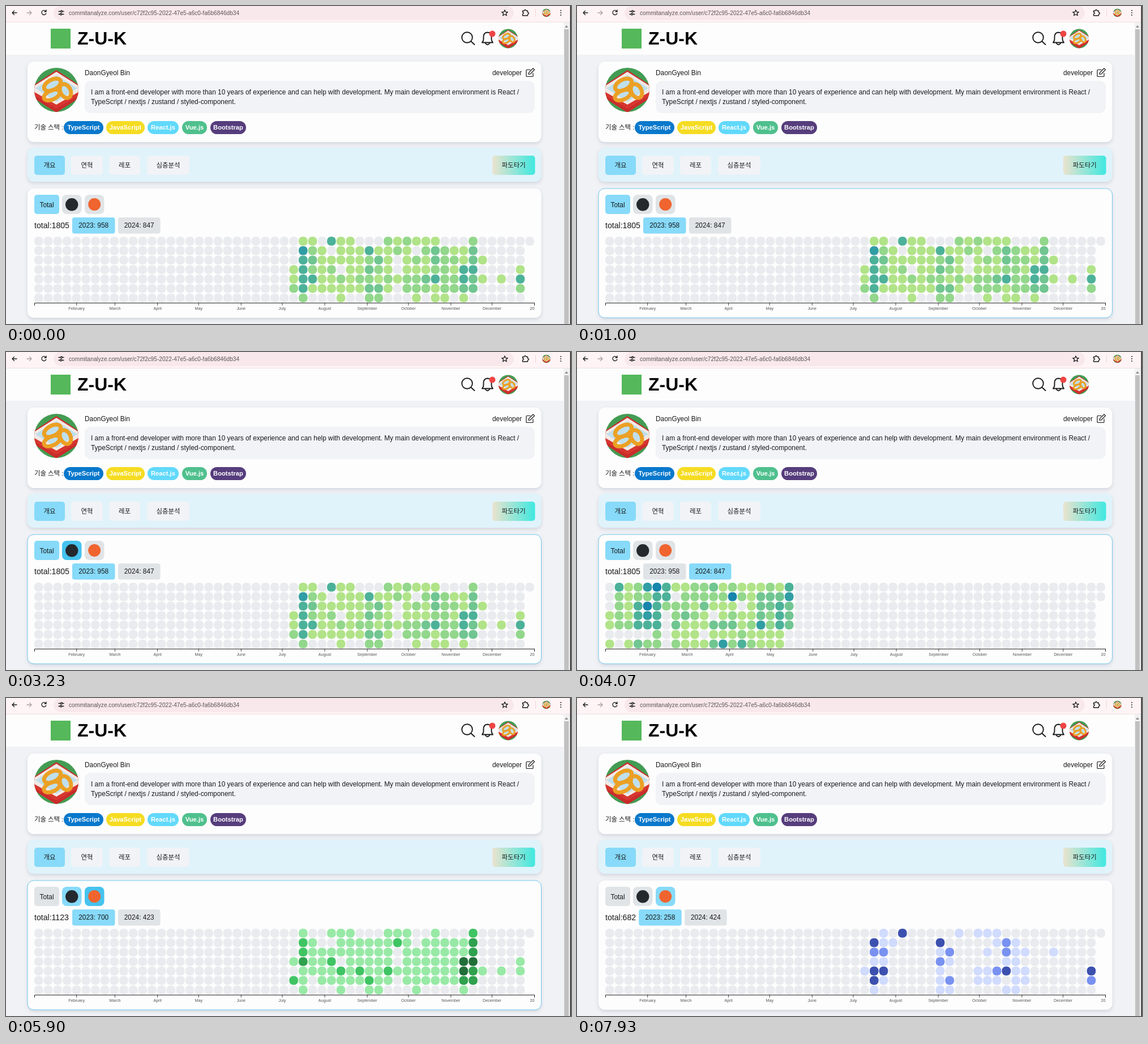
Animation, 998 px wide and 561 px high, one loop 8000 ms. Source, as an HTML page:

```html
<!DOCTYPE html>
<html lang="ko">
<head>
<meta charset="utf-8">
<title>Commit dashboard</title>
<style>
  html, body { margin: 0; width: 100%; height: 100%; overflow: hidden; background: #f0f2f5; }
  svg { display: block; width: 100%; height: 100%; }
  text { font: 11.9px "Liberation Sans", "Noto Sans CJK KR", "Noto Sans CJK", sans-serif; fill: #18191b; }
  .mid { text-anchor: middle; }
  .korean { font-size: 11.4px; }
  .tag { font-size: 11.2px; font-weight: bold; fill: #fff; }
  .axis text { font-size: 7.2px; fill: #555; }
  .card { filter: drop-shadow(0 3px 3px rgba(60, 70, 110, .16)); }
  .line { fill: none; stroke: #18191b; stroke-linecap: round; stroke-linejoin: round; }
</style>
</head>
<body>
<svg viewBox="0 0 998 561">
  <defs>
    <clipPath id="round"><circle cx="40" cy="40" r="39"/></clipPath>
    <clipPath id="plot"><rect x="49" y="520" width="885" height="25"/></clipPath>
    <linearGradient id="wave">
      <stop offset="0" stop-color="#ebe3cd"/>
      <stop offset="1" stop-color="#40e8e0"/>
    </linearGradient>
    <symbol id="avatar" viewBox="0 0 80 80">
      <g clip-path="url(#round)">
        <path fill="#439c53" d="M0 0h80v80H0z"/>
        <path fill="#c92c2b" d="M40 5 84 34v18L40 80-4 52V34z"/>
        <path fill="#f2e9e5" d="M40 8 84 36v8L40 70-4 44v-8z"/>
        <path fill="#d7362f" d="M-4 41 40 66 84 41v7L40 73-4 48z"/>
        <path fill="#bfdfed" d="M40 14 77 37 40 61 3 37z"/>
        <g fill="none" stroke="#eba024" stroke-width="7">
          <ellipse cx="33" cy="31" rx="16" ry="9" transform="rotate(-28 33 31)"/>
          <ellipse cx="56" cy="42" rx="9" ry="13" transform="rotate(-28 56 42)"/>
          <ellipse cx="32" cy="49" rx="15" ry="8" transform="rotate(-24 32 49)"/>
        </g>
      </g>
    </symbol>
  </defs>

  <!-- browser bar -->
  <path fill="#fff4f5" d="M0 0h998v29H0z"/>
  <rect x="84" width="813" height="25" rx="12.5" fill="#f8e8eb"/>
  <path fill="#efdfe2" d="M0 28h998v1H0z"/>
  <g class="line" stroke-width="1.3">
    <path d="M19 12h-8m3.5-3.5L11 12l3.5 3.5"/>
    <path stroke="#aaa0a3" style="stroke:#aaa0a3" d="M37 12h8m-3.5-3.5L45 12l-3.5 3.5"/>
    <path d="M70 9a4 4 0 1 0 .8 4M71 7v3h-3"/>
    <path d="M93 9.5h3m4 0h2m-9 5h2m4 0h3"/>
    <circle cx="98" cy="9.5" r="1.5"/><circle cx="97" cy="14.5" r="1.5"/>
    <path d="m881 7 1.5 3.4 3.7.3-2.8 2.4.9 3.7-3.3-2-3.3 2 .9-3.7-2.8-2.4 3.7-.3z"/>
    <path d="M912.500 8.500h3q0-2 1.500-2t1.500 2h3v3q2 0 2 1.500t-2 1.500v2.500h-9v-3q2 0 2-1.500t-2-1.500z"/>
  </g>
  <path fill="#f0cfd5" d="M935 5h1v14h-1z"/>
  <use href="#avatar" x="947" y="4.500" width="15" height="15"/>
  <g fill="#333"><circle cx="980" cy="8" r="1.100"/><circle cx="980" cy="12" r="1.100"/><circle cx="980" cy="16" r="1.100"/></g>
  <text x="111" y="15.600" style="font-size:10.150px;fill:#5d5457">commitanalyze.com/user/c72f2c95-2022-47e5-a6c0-fa6b6846db34</text>

  <!-- site header -->
  <path fill="#fdfdfd" d="M0 29h985v57H0z"/>
  <rect x="79" y="40" width="35" height="35" fill="#55b85a"/>
  <text x="126" y="67.500" style="font-size:32px;font-weight:bold;fill:#080808">Z-U-K</text>
  <g class="line" stroke-width="1.900">
    <circle cx="814.500" cy="55.500" r="9.300"/>
    <path d="m821.500 62.500 6 5.500"/>
    <path d="M841 64.500q2.500-3 2.500-6v-4q0-7.500 7-8 7 .5 7 8v4q0 3 2.500 6zM847 66q3.500 4.500 7 0"/>
  </g>
  <circle cx="859" cy="49" r="5.500" fill="#ef4444"/>
  <use href="#avatar" x="869.500" y="40" width="35" height="35"/>

  <!-- scrollbar -->
  <path fill="#f2f2f2" d="M985 29h11v532h-11z"/>
  <path fill="#8b8b8b" d="m990 34 3 4h-6z"/>
  <path fill="#c1c1c1" d="M986 41h8v520h-8z"/>
  <path fill="#222" d="M996.500 0h1.500v561h-1.500z"/>

  <!-- profile -->
  <rect class="card" x="38" y="98" width="907.500" height="142" rx="11" fill="#fdfdfd"/>
  <rect id="profileEdge" x="38" y="97.500" width="907.500" height="142.500" rx="11" fill="none" stroke="#74c2ee"/>
  <use href="#avatar" x="49" y="108" width="80" height="80"/>
  <text x="139" y="122">DaonGyeol Bin</text>
  <text x="859" y="122">developer</text>
  <path class="line" stroke-width="1.200" d="M926 112.500h-6q-1 0-1 1v10q0 1 1 1h10q1 0 1-1v-5m-8 2 .5-3 7.500-7.500 2.500 2.500-7.500 7.500z"/>
  <rect x="139" y="132" width="795" height="57" rx="11" fill="#f1f3f6"/>
  <text x="150" y="156">I am a front-end developer with more than 10 years of experience and can help with development. My main development environment is React /</text>
  <text x="150" y="173">TypeScript / nextjs / zustand / styled-component.</text>
  <text class="korean" x="50" y="218">기술 스택 :</text>
  <g id="tags"></g>

  <!-- tabs -->
  <rect class="card" x="38" y="250" width="907.500" height="60" rx="11" fill="#e0f3fb"/>
  <g id="tabs"></g>

  <!-- activity chart -->
  <rect class="card" x="38" y="322" width="907.500" height="228" rx="11" fill="#fdfdfd"/>
  <rect id="chartEdge" x="38" y="322" width="907.500" height="228" rx="11" fill="none" stroke="#74c8ee"/>
  <rect id="totalButton" x="50" y="333" width="44" height="34" rx="5"/>
  <text class="mid" x="72" y="354.500">Total</text>
  <rect id="githubButton" x="99" y="333" width="34.500" height="34" rx="8"/>
  <circle cx="116.200" cy="350.300" r="11.200" fill="#24292e"/>
  <rect id="gitlabButton" x="139" y="333" width="34.500" height="34" rx="8"/>
  <circle cx="156.200" cy="350" r="11" fill="#f0642f"/>
  <text id="totalText" x="50" y="391.500" style="font-size:14.100px"></text>
  <g id="years">
    <rect id="button2023" x="117" y="373" width="75.500" height="28.500" rx="4"/>
    <text id="text2023" class="mid" x="154.700" y="391.300"></text>
    <rect id="button2024" x="198" y="373" width="74.500" height="28.500" rx="4"/>
    <text id="text2024" class="mid" x="235.200" y="391.300"></text>
  </g>
  <g id="cells"></g>
  <g id="axis" class="axis" clip-path="url(#plot)"></g>
</svg>

<script>
const LOOP = 8000;
const WEEKS = 53, PITCH = 884 / WEEKS, CELL = 15.6;
const SELECTED = "#87daf9", HOVERED = "#46c3ef", IDLE = "#e0e4e6", EMPTY = "#e9ebee";
const MONTHS = ["February", "March", "April", "May", "June", "July", "August",
  "September", "October", "November", "December"];
const byId = id => document.getElementById(id);

function add(parent, tag, attributes, text = "") {
  const node = document.createElementNS("http://www.w3.org/2000/svg", tag);
  for (const name in attributes) node.setAttribute(name, attributes[name]);
  node.textContent = text;
  return parent.appendChild(node);
}

function addPill(parent, x, y, width, height, rx, fill, label, textClass, baseline) {
  add(parent, "rect", { x, y, width, height, rx, fill });
  add(parent, "text", { x: x + width / 2, y: baseline, class: "mid " + textClass }, label);
}

for (const [label, x, width, fill] of [
  ["TypeScript", 102, 70, "#0878cc"], ["JavaScript", 177, 68, "#f5dc22"],
  ["React.js", 250, 55, "#61d9fb"], ["Vue.js", 311, 44, "#4fc08d"], ["Bootstrap", 361, 63, "#563d7c"],
]) addPill(byId("tags"), x, 203, width, 23, 11.5, fill, label, "tag", 218.3);

for (const [label, x, width, fill] of [
  ["개요", 50, 54, SELECTED], ["연혁", 115, 56, "#f1f3f6"], ["레포", 182, 55, "#f1f3f6"],
  ["심층분석", 249, 75, "#f1f3f6"], ["파도타기", 859, 75.5, "url(#wave)"],
]) addPill(byId("tabs"), x, 264, width, 34, 5, fill, label, "korean", 285);

// Each row is a weekday: "week", "from-to" or "from-to:level"; later entries win.
const parseRows = rows => rows.map(row => {
  const levels = Array(WEEKS).fill(0);
  for (const part of row.split(" ")) {
    const [span, level = 1] = part.split(":");
    const [from, to = from] = span.split("-");
    levels.fill(+level, +from, +to + 1);
  }
  return levels;
});

const github = parseRows([
  "28 31-33 37-39 42 46:2",
  "28:2 29 32-45 38:2 40:0 46:3",
  "28:2 29-45 38:0 46:3",
  "27-44 28:3 31:2 32:0 38:0 45-46:4 51",
  "28-44 32:2 34:2 37:2 45:4 46:3 47 49 51",
  "27:2 28-44 29:0 35:2 38:0 45-46:3",
  "28 32 35-36 40 45",
]);
const gitlab = parseRows([
  "29 31:3 37 39-41",
  "28:3 29-30 35:3 41 42:2 43",
  "28-29:2 35 36:2 40 42:2 43-44 47",
  "28-29 35:2 36 42-43",
  "27 28-29:3 35 39-40 41:2 42:3 43-44 51:3",
  "28:3 29 35 36:2 39-41 43-44 51:2",
  "28 35-36 42-43",
]);
const both2023 = github.map((row, day) => row.map((level, week) => level + gitlab[day][week]));
const both2024 = [
  "04125641122312111214",
  "02122440222226213335",
  "02146422213111013343",
  "12145402321012113243",
  "12244403111333125243",
  "00000201110111211110",
  "10132202111352421110",
];

const mixed = [EMPTY, "#b1e388", "#92d78b", "#70c591", "#4cb199", "#309da4", "#1785ac"];
const greens = [EMPTY, "#98e9a6", "#40c463", "#30a14e", "#216e39"];
const blues = [EMPTY, "#d0dbfd", "#7992f1", "#3c50af"];
const views = [
  { start: 0, source: "total", year: 2023, levels: both2023, colors: mixed, counts: [958, 847] },
  { start: 3900, source: "total", year: 2024, levels: both2024, colors: mixed, counts: [958, 847] },
  { start: 5050, source: "github", year: 2023, levels: github, colors: greens, counts: [700, 423] },
  { start: 6350, source: "gitlab", year: 2023, levels: gitlab, colors: blues, counts: [258, 424] },
];
const hovers = {
  profile: [[1600, 2350]],
  chart: [[550, 1450], [2600, 7300]],
  github: [[2950, 3500], [4400, 5400]],
  gitlab: [[5550, 7100]],
};

const cells = [];
for (let week = 0; week < WEEKS; week++)
  for (let day = 0; day < 7; day++)
    cells.push({ week, day, node: add(byId("cells"), "rect", {
      x: 50 + week * PITCH, y: 407.1 + day * PITCH, width: CELL, height: CELL, rx: 6.8 }) });

function drawAxis(year) {
  const axis = byId("axis");
  axis.replaceChildren();
  add(axis, "path", { class: "line", "stroke-width": 1, d: "M50.5 528v-4H933.5v4" });
  const dayOfYear = month => (Date.UTC(year, month) - Date.UTC(year, 0)) / 864e5;
  [...MONTHS, year + 1].forEach((label, i) => {
    const x = 49.6 + 884 * dayOfYear(i + 1) / dayOfYear(12);
    add(axis, "path", { class: "line", "stroke-width": .8, d: `M${x} 524v4` });
    add(axis, "text", { x, y: 535.6, class: "mid" }, label);
  });
}

function showView(view) {
  const { source, year, levels, colors, counts } = view;
  const lastWeekDays = year === 2024 ? 2 : 1;
  for (const { week, day, node } of cells) {
    node.setAttribute("fill", colors[levels[day][week] || 0]);
    node.setAttribute("visibility", week < WEEKS - 1 || day < lastWeekDays ? "visible" : "hidden");
  }
  drawAxis(year);
  byId("totalText").textContent = "total:" + (counts[0] + counts[1]);
  byId("years").setAttribute("transform", `translate(${source === "gitlab" ? -7.8 : 0})`);
  [2023, 2024].forEach((y, i) => {
    byId("text" + y).textContent = `${y}: ${counts[i]}`;
    byId("button" + y).setAttribute("fill", y === year ? SELECTED : IDLE);
  });
}

// Strength of a hover effect, fading in and out over 150 ms.
const hoverAmount = (name, t) => Math.max(...hovers[name].map(([from, to]) =>
  Math.max(0, Math.min(1, (t - from) / 150, (to + 150 - t) / 150))));

let shown;
function draw(now) {
  const t = now % LOOP;
  const view = views.findLast(v => t >= v.start);
  if (view !== shown) showView(shown = view);
  byId("profileEdge").setAttribute("opacity", hoverAmount("profile", t));
  byId("chartEdge").setAttribute("opacity", hoverAmount("chart", t));
  for (const source of ["total", "github", "gitlab"]) {
    const hovered = source in hovers && hoverAmount(source, t) > .5;
    byId(source + "Button").setAttribute("fill",
      hovered ? HOVERED : source === view.source ? SELECTED : IDLE);
  }
}

const begin = performance.now();
function tick() {
  draw(performance.now() - begin);
  requestAnimationFrame(tick);
}
tick();
</script>
</body>
</html>
```
